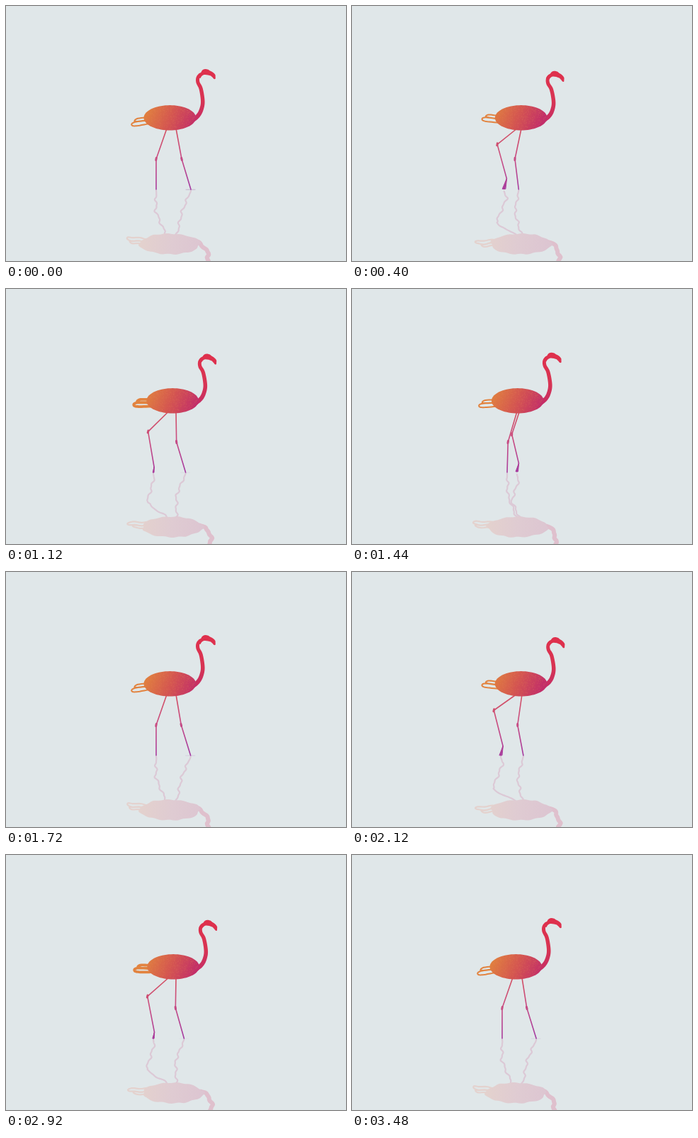
An HTML page for the animation above (3.52 s loop, 480 by 360 pixels).

```html
<!DOCTYPE html>
<html lang="en">
<head>
<meta charset="utf-8">
<title>Walking flamingo</title>
<style>
html, body { margin: 0; width: 100%; height: 100%; overflow: hidden; background: #e0e7e9; }
svg { display: block; width: 100vw; height: 100vh; }
path { stroke-linecap: round; stroke-linejoin: round; }
</style>
</head>
<body>
<svg id="stage" viewBox="0 0 480 360">
  <defs>
    <linearGradient id="bodyFill" gradientUnits="userSpaceOnUse" x1="199" y1="146" x2="264" y2="174">
      <stop offset="0" stop-color="#e0803f"/><stop offset=".5" stop-color="#d45650"/><stop offset="1" stop-color="#c22e69"/>
    </linearGradient>
    <linearGradient id="neckFill" gradientUnits="userSpaceOnUse" x1="0" y1="90" x2="0" y2="162">
      <stop offset="0" stop-color="#df304c"/><stop offset=".6" stop-color="#d83453"/><stop offset="1" stop-color="#c62e64"/>
    </linearGradient>
    <linearGradient id="legFill" gradientUnits="userSpaceOnUse" x1="222" y1="172" x2="236" y2="262">
      <stop offset="0" stop-color="#d4505f"/><stop offset=".45" stop-color="#c94d82"/><stop offset="1" stop-color="#a33aa2"/>
    </linearGradient>
    <linearGradient id="waterFill" gradientUnits="userSpaceOnUse" x1="185" y1="335" x2="285" y2="345">
      <stop offset="0" stop-color="#e4d2cd"/><stop offset=".5" stop-color="#dfcbd2"/><stop offset="1" stop-color="#dcc4d1"/>
    </linearGradient>
  </defs>
  <g id="water"></g>
  <g id="bird"></g>
</svg>
<script>
const LOOP = 3520, STEP = 888, TICK = 40, GROUND = 259.5;

const clamp = u => Math.max(0, Math.min(1, u));
// Eased 0..1 between two moments of a step.
const ease = (s, from, to) => {
  const u = clamp((s - from) / (to - from));
  return u * u * (3 - 2 * u);
};
// Rounded rise and fall around one moment.
const bump = (s, mid, half) =>
  Math.abs(s - mid) < half ? Math.cos((s - mid) / half * Math.PI / 2) ** 2 : 0;

function makePath(parent, fill, stroke = "none", width = 0) {
  const el = document.createElementNS("http://www.w3.org/2000/svg", "path");
  el.setAttribute("fill", fill);
  el.setAttribute("stroke", stroke);
  el.setAttribute("stroke-width", width);
  parent.appendChild(el);
  return el;
}
const draw = (el, d) => el.setAttribute("d", d);
const line = (pts, close) =>
  "M" + pts.map(p => p[0].toFixed(2) + " " + p[1].toFixed(2)).join("L") + (close ? "Z" : "");

const bird = document.getElementById("bird"), water = document.getElementById("water");
const makeLeg = () => ({
  echo: makePath(water, "none", "#dcc9d6", 2.2),
  flat: makePath(bird, "none", "#bd9fc4", 1),
  bone: makePath(bird, "none", "url(#legFill)", 1.6),
  knee: makePath(bird, "none", "url(#legFill)", 3),
  web: makePath(bird, "url(#legFill)", "url(#legFill)", 1)
});
const legs = [makeLeg(), makeLeg()];
const parts = {
  tailEcho: makePath(water, "none", "#e4d2ce", 2.2),
  neckEcho: makePath(water, "none", "#dfc0cd", 6),
  bodyEcho: makePath(water, "url(#waterFill)"),
  tail: makePath(bird, "none", "#e2833f", 2),
  neck: makePath(bird, "url(#neckFill)"),
  head: makePath(bird, "url(#neckFill)"),
  body: makePath(bird, "url(#bodyFill)"),
  grain: makePath(bird, "none", "#e88a5c", .8)
};
parts.grain.setAttribute("opacity", .28);
draw(parts.head, "M270 101Q271 96 275.5 93.5Q277 89 282 89Q286 89 288 91.5Q294 94 295.6 97.5"
  + "L295.8 102.5Q294 104.5 291.8 101L289 98.5Q284 96.5 279.5 97Q276 98 274.5 102Z");

const neckPoints = [[264, 161], [271, 155], [275.5, 147], [277.8, 135],
  [275.2, 117], [271, 108], [271, 101], [275, 96]];
const tailLoops = [
  [[201, 157], [186, 158.8], [181.5, 162], [184.5, 163], [201, 161]],
  [[201, 161.5], [184, 163.5], [177.8, 166], [178.5, 169], [186, 169], [203, 166]]
];

let seed = 7;
const random = () => (seed = seed * 16807 % 2147483647) / 2147483647;
let specks = "";
for (let i = 0; i < 380; i++) {
  const a = random() * Math.PI * 2, r = Math.sqrt(random()) * .96;
  specks += `M${(231.3 + 36.5 * r * Math.cos(a)).toFixed(1)} ${(157.8 + 17.4 * r * Math.sin(a)).toFixed(1)}h.1`;
}
draw(parts.grain, specks);

// Rounds a point list by sampling a Catmull-Rom curve.
function smooth(pts, n = 6) {
  const out = [], last = pts.length - 1;
  for (let i = 0; i < last; i++) {
    const a = pts[Math.max(0, i - 1)], b = pts[i], c = pts[i + 1], d = pts[Math.min(last, i + 2)];
    for (let k = 0; k < n; k++) {
      const u = k / n;
      out.push([0, 1].map(j => b[j] + .5 * u * (c[j] - a[j]
        + u * (2 * a[j] - 5 * b[j] + 4 * c[j] - d[j] + u * (3 * (b[j] - c[j]) + d[j] - a[j])))));
    }
  }
  return [...out, pts[last]];
}

// Splits straight lines into short pieces.
const split = pts => pts.flatMap((p, i) => {
  const q = pts[i + 1];
  return q ? Array.from({ length: 24 }, (_, k) => [0, 1].map(j => p[j] + (q[j] - p[j]) * k / 24)) : [p];
});

// Outline around a curve whose width changes evenly from end to end.
function taper(pts, from, to) {
  const last = pts.length - 1;
  const side = sign => pts.map(([x, y], i) => {
    const a = pts[Math.max(0, i - 1)], b = pts[Math.min(last, i + 1)];
    const dx = b[0] - a[0], dy = b[1] - a[1];
    const w = sign * (from + (to - from) * i / last) / 2 / Math.hypot(dx, dy);
    return [x - dy * w, y + dx * w];
  });
  return [...side(1), ...side(-1).reverse()];
}

function mirror(pts, mid, t) {
  const w = t / LOOP * Math.PI * 2;
  return pts.map(([x, y]) => {
    const h = GROUND - y, down = h * (.66 + .00078 * h), far = clamp(down / 75);
    const wave = 1.4 * Math.sin(down * .38 - w * 4) + .7 * Math.sin(down * .77 + w * 6 + 1);
    const lift = .7 * far * Math.sin(x * .35 + w * 4);
    return [mid + (x - mid) * (1 + .17 * far * far) + wave * clamp(down / 12), 260.5 + down + lift];
  });
}

function stancePose(s) {
  const toe = [261 - 49 * ease(s, 80, 700), 259];
  return {
    hip: [240 - 13 * ease(s, 330, 750), 173],
    knee: [248 - 36 * ease(s, 0, 800), 216],
    ankle: toe, toe, web: 0, flat: 1 - s / 300
  };
}

function swingPose(s) {
  const fold = bump(s, 430, 330), foot = 4 + 11 * fold;
  const knee = [212 + 36 * ease(s, 300, 880) - 13 * bump(s, 300, 300), 216 - 21 * bump(s, 370, 370)];
  const toe = [212 + 49 * ease(s, 300, 860) - 4 * bump(s, 250, 250), 259 - 1.5 * bump(s, 500, 200)];
  const dx = knee[0] - toe[0], dy = knee[1] - toe[1], len = Math.hypot(dx, dy);
  return {
    hip: [227 + 13 * ease(s, 0, 850), 173],
    knee, toe,
    ankle: [toe[0] + dx / len * foot + 6 * fold, toe[1] + dy / len * foot],
    web: 2.6 * fold, flat: (s - 780) / 108
  };
}

function drawLeg(leg, { hip, knee, ankle, toe, web, flat }, mid, t) {
  draw(leg.bone, line([hip, knee, ankle, toe]));
  const dx = ankle[0] - hip[0], dy = ankle[1] - hip[1], k = 1.5 / Math.hypot(dx, dy);
  draw(leg.knee, line([-k, k].map(m => [knee[0] + dx * m, knee[1] + dy * m])));
  draw(leg.web, web > .3 ? line([ankle, [toe[0] - web, toe[1]], [toe[0] + web * .7, toe[1]]], true) : "");
  draw(leg.flat, line([[toe[0] - 7, 259.2], [toe[0] + 6, 259.2]]));
  leg.flat.setAttribute("opacity", (clamp(flat) * .75).toFixed(3));
  draw(leg.echo, line(mirror(split([toe, ankle, knee, hip]), mid, t)));
}

function render(t) {
  const step = Math.floor(t / STEP), s = t - step * STEP;
  const sway = bump(s, 375, 290), shift = 7.5 * sway, mid = 231.3 + shift;
  const nodX = 5.5 * bump(s, 345, 200), nodY = 2.7 * bump(s, 330, 330), turn = 6 * bump(s, 320, 330);

  const oval = Array.from({ length: 72 }, (_, i) => {
    const a = i / 36 * Math.PI;
    return [mid + 36.8 * Math.cos(a), 157.8 + 17.7 * Math.sin(a)];
  });
  draw(parts.body, line(oval, true));
  draw(parts.bodyEcho, line(mirror(oval, mid, t), true));
  parts.grain.setAttribute("transform", `translate(${shift.toFixed(2)} 0)`);

  const neck = smooth(neckPoints.map(([x, y], i) => {
    const k = i / (neckPoints.length - 1);
    return [x + shift + (nodX - shift) * k * k, y + nodY * k];
  }));
  draw(parts.neck, line(taper(neck, 6.2, 4.6), true));
  draw(parts.neckEcho, line(mirror(neck, mid, t)));
  parts.head.setAttribute("transform",
    `translate(${nodX.toFixed(2)} ${nodY.toFixed(2)}) rotate(${turn.toFixed(2)} 279 92)`);

  const angle = .27 * sway, c = Math.cos(angle), n = Math.sin(angle);
  const tails = tailLoops.map(loop => smooth(loop.map(([x, y]) => {
    const dx = x - 203, dy = y - 160;
    return [203 + shift + dx * c - dy * n, 160 - sway + dx * n + dy * c];
  })));
  draw(parts.tail, tails.map(p => line(p)).join(""));
  parts.tail.setAttribute("stroke-width", (2 + 1.8 * bump(s, 235, 120)).toFixed(2));
  draw(parts.tailEcho, tails.map(p => line(mirror(p, mid, t))).join(""));

  legs.forEach((leg, i) => drawLeg(leg, (step + i) % 2 ? swingPose(s) : stancePose(s), mid, t));
}

const start = performance.now();
function frame() {
  const t = (performance.now() - start) % LOOP;
  render(Math.floor(t / TICK) * TICK);
  requestAnimationFrame(frame);
}
frame();
</script>
</body>
</html>
```
